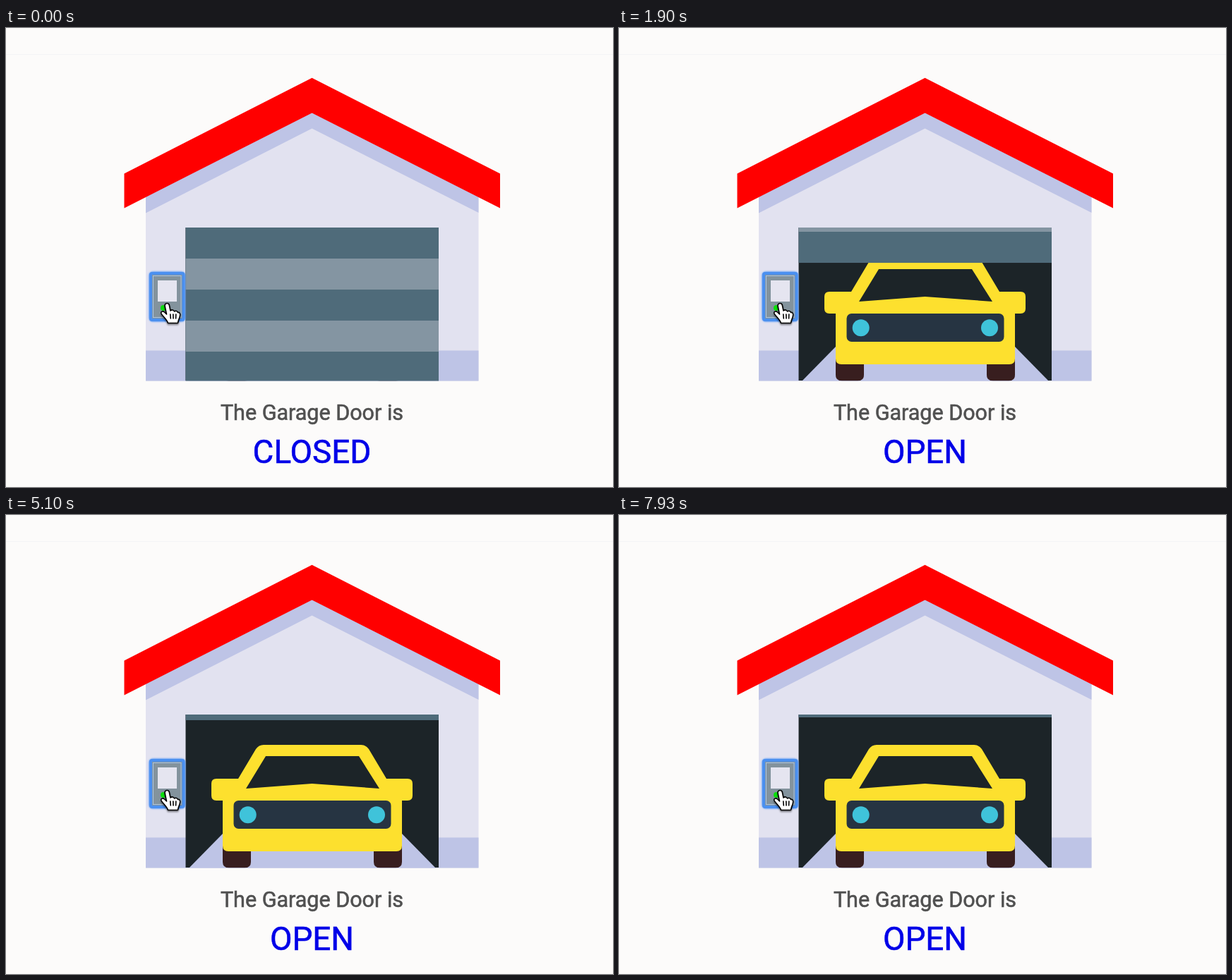
Write an HTML page that moves like this. It is 860 px wide and 651 px high and loops after 8 s.

```html
<!DOCTYPE html>
<html lang="en">
<head>
<meta charset="utf-8">
<title>Garage door</title>
<style>
  html, body { margin: 0; width: 100%; height: 100%; overflow: hidden; background: #fcfbfa; }
  svg { display: block; width: 100%; height: 100%; }
  text { font-family: Roboto, sans-serif; text-anchor: middle; stroke-width: .6; }
  .caption { fill: #505050; stroke: #505050; }
  .state { fill: #0000e8; stroke: #0000e8; }
  .wall { fill: #e2e2f0; }
  .shade { fill: #bec4e6; }
  .dark { fill: #4f6b7a; }
  .light { fill: #8495a2; }
  .hole { fill: #1c2428; }
  .yellow { fill: #fde02e; }
  .grille { fill: #263442; }
  .lamp { fill: #3fc3da; }
  .tyre { fill: #381e1f; }
</style>
</head>
<body>
<svg viewBox="0 0 860 651">
  <defs>
    <clipPath id="opening"><rect x="254.5" y="283" width="358.5" height="217.5"/></clipPath>
    <filter id="glow" x="-30%" y="-30%" width="160%" height="160%"><feGaussianBlur stdDeviation="1.2"/></filter>
    <filter id="shadow" x="-50%" y="-50%" width="200%" height="200%">
      <feDropShadow dx="0" dy="2" stdDeviation="1.3" flood-opacity=".45"/>
    </filter>
  </defs>

  <path d="M0 37.5H860" stroke="#f4f4f6"/>

  <!-- House -->
  <path class="wall" d="M198 240L433.5 120L669.5 240V500.5H198Z"/>
  <path class="shade" d="M198 235L433.5 115L669.5 235V262L433.5 142.5L198 262.5Z"/>
  <path class="shade" d="M198 457.5H669.5V500.5H198Z"/>
  <path fill="#f00" d="M167.5 206.5L433.5 70.7L700 206.5V255.5L433.5 120.5L167.5 255.5Z"/>

  <g clip-path="url(#opening)">
    <rect class="hole" x="254" y="283" width="360" height="217"/>
    <path class="shade" d="M258 502L307 452H561L610 502Z"/>

    <!-- Car -->
    <path class="tyre" d="M307 465H347V492Q347 500.5 338 500.5H316Q307 500.5 307 492Z"/>
    <path class="tyre" d="M521 465H561V492Q561 500.5 552 500.5H530Q521 500.5 521 492Z"/>
    <path class="yellow" d="M365 326H503Q510 326 514 332L539 374H569Q576 374 576 381V398Q576 405 569 405H561V469Q561 477 553 477H315Q307 477 307 469V405H298Q291 405 291 398V381Q291 374 298 374H329L354 332Q358 326 365 326Z"/>
    <path class="hole" d="M368 342H500L529 388L433.5 381L340 388Z"/>
    <rect class="grille" x="322.5" y="405" width="223" height="40" rx="7"/>
    <circle class="lamp" cx="342.7" cy="425.3" r="12"/>
    <circle class="lamp" cx="525" cy="425.3" r="12"/>

    <g id="door">
      <rect class="dark" x="254" y="283" width="360" height="220"/>
      <path class="light" d="M254 327H614V371H254ZM254 415H614V459H254Z"/>
    </g>
  </g>

  <!-- Focused wall switch -->
  <rect x="205" y="348" width="46.5" height="66" rx="3" fill="none" stroke="#4c92f5" stroke-width="5" filter="url(#glow)"/>
  <rect x="205" y="348" width="46.5" height="66" rx="2" fill="#83939d" stroke="#4b90f0" stroke-width="4"/>
  <rect x="208.5" y="351.5" width="39.5" height="59" fill="none" stroke="#a9c4e4"/>
  <rect x="215" y="358" width="27" height="30" fill="#e5e5f0"/>
  <circle cx="223" cy="397" r="4" fill="#0ce00c"/>

  <!-- Pointer -->
  <g filter="url(#shadow)" stroke="#000" stroke-width="1.6" stroke-linejoin="round" stroke-linecap="round">
    <path fill="#fff" d="M225 394C225 389.5 230.5 389.5 231.3 393L233 401C235 399 238 400 238.5 402C240.5 400.5 243 401.5 243.5 403.5C246 403 247 405 246.6 407.5C246 412 244 414 243.5 418.5H229.5C228 413 222 409 220 405C219 402 222 401 224.5 403L227.5 406Z"/>
    <path fill="none" d="M232.8 406L233.3 412M236.8 406L237 412M240.8 406L240.6 412"/>
  </g>

  <text class="caption" x="433.5" y="556" font-size="30.5">The Garage Door is</text>
  <text class="state" id="state" x="433.5" y="617" font-size="45.8">CLOSED</text>
</svg>
<script>
  const LOOP = 8000, OPEN_START = 980, OPEN_TIME = 1900, LIFT = 216;
  const door = document.getElementById('door');
  const state = document.getElementById('state');

  // Cubic Bezier (.25, .1, .25, 1), solved for x by bisection.
  function ease(x) {
    if (x <= 0) return 0;
    if (x >= 1) return 1;
    let low = 0, high = 1;
    for (let i = 0; i < 24; i++) {
      const s = (low + high) / 2;
      if (0.75 * s * (1 - s) + s ** 3 < x) low = s; else high = s;
    }
    return 0.3 * low * (1 - low) ** 2 + 3 * low ** 2 * (1 - low) + low ** 3;
  }

  function draw(now) {
    const t = now % LOOP;
    const dip = t >= 5000 && t < 5500 ? 4 : 0;
    const lift = LIFT * ease((t - OPEN_START) / OPEN_TIME) - dip;
    door.setAttribute('transform', `translate(0 ${-lift})`);
    state.textContent = t < OPEN_START ? 'CLOSED' : 'OPEN';
  }

  const start = performance.now();
  function tick() {
    draw(performance.now() - start);
    requestAnimationFrame(tick);
  }
  tick();
</script>
</body>
</html>
```
